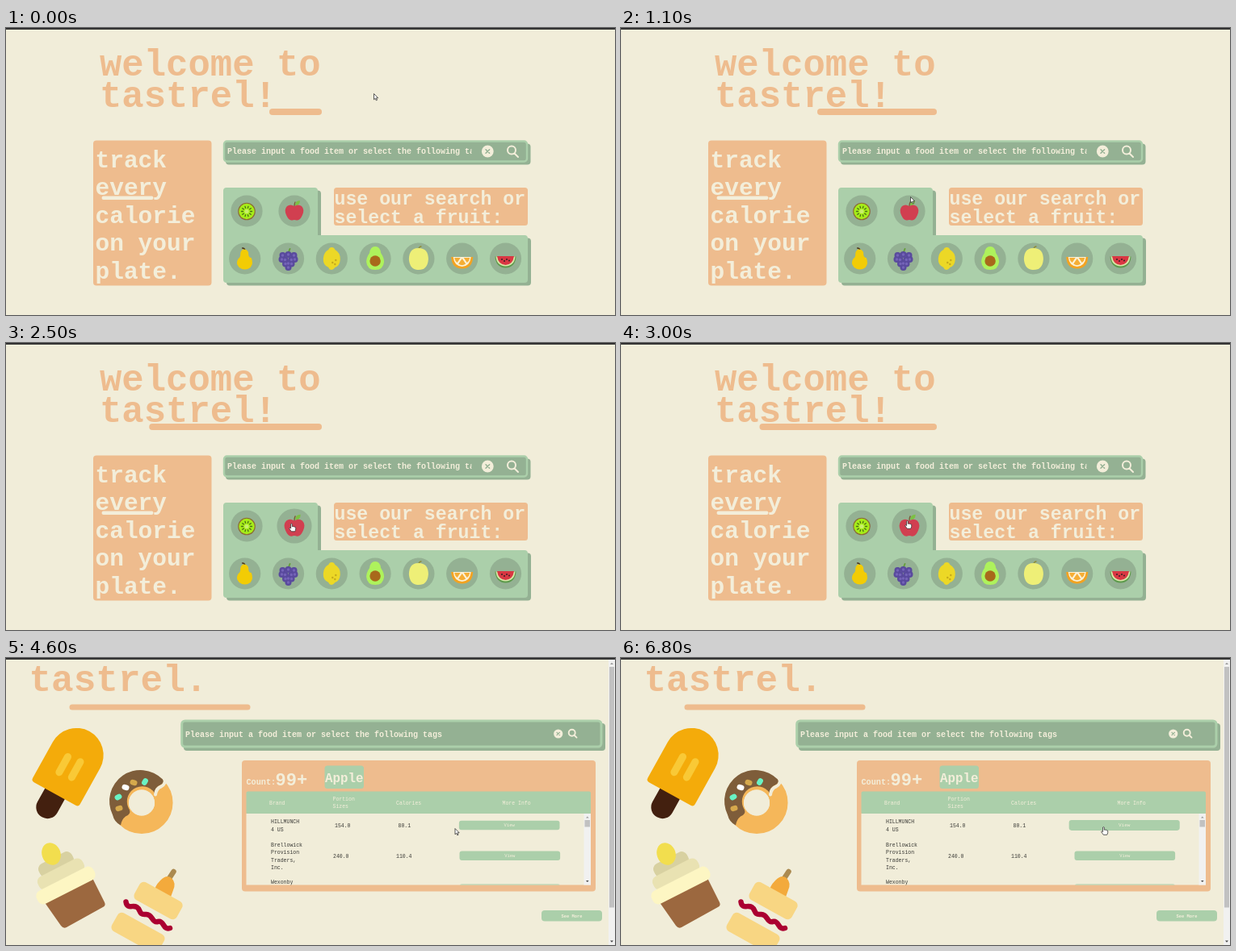
Recreate the animation shown at these times as an HTML page. Size 754 by 356 pixels, loop 8 s.

```html
<!DOCTYPE html>
<html lang="en">
<head>
<meta charset="utf-8">
<title>Food tracker</title>
<style>
  html, body { margin: 0; width: 100%; height: 100%; overflow: hidden; background: #f1edd9; }
  svg { display: block; width: 754px; height: 356px; }
  text { font-family: "Liberation Mono", "DejaVu Sans Mono", monospace; fill: #f3eeda; white-space: pre; }
  .b { font-weight: bold; }
  .peach { fill: #eebc8e; }
  .light { fill: #abcfaa; }
  .dark { fill: #94b193; }
  .cream { fill: #f3eeda; }
  .ink { fill: #3a3a36; }
  .line { fill: none; stroke-linecap: round; }
</style>
</head>
<body>
<svg viewBox="0 0 754 356">
  <defs>
    <clipPath id="inputClip"><rect x="274" y="142" width="302.5" height="22"/></clipPath>
    <clipPath id="rowsClip"><rect x="297.5" y="193" width="426.5" height="88.5"/></clipPath>
  </defs>
  <rect width="754" height="356" fill="#f1edd9"/>

  <g id="home">
    <rect id="bar" class="peach" y="100" height="8" rx="4"/>
    <rect class="peach" x="108" y="139.5" width="146.5" height="180" rx="4"/>
    <rect class="cream" x="118.500" y="208.500" width="64" height="4.500" rx="2.200"/>

    <rect class="dark" x="272" y="143.500" width="377.500" height="26" rx="4"/>
    <rect class="dark" x="270" y="140.500" width="375" height="25" rx="3.500" stroke="#abcfaa" stroke-width="2.400"/>
    <g id="hint" clip-path="url(#inputClip)"></g>
    <circle class="cream" cx="596.300" cy="153" r="7.400"/>
    <path class="line" d="M594 150.700l4.600 4.600m0-4.600l-4.600 4.600" stroke="#94b193" stroke-width="1.500"/>
    <path class="line" d="M629.500 155.500L634 160M631 151.500a5 5 0 1 0-10 0a5 5 0 1 0 10 0" stroke="#f3eeda" stroke-width="2"/>

    <path id="tray" class="dark" transform="translate(4 3.500)"
      d="M273 198H382a4 4 0 0 1 4 4V257H642a4 4 0 0 1 4 4V312a4 4 0 0 1-4 4H273a4 4 0 0 1-4-4V202a4 4 0 0 1 4-4z"/>
    <use href="#tray" id="trayTop"/>
    <rect class="peach" x="406" y="198" width="240" height="47" rx="3.500"/>
    <g id="fruits"></g>
  </g>

  <g id="results">
    <rect class="peach" x="78.500" y="57.500" width="224" height="7" rx="3.500"/>

    <g transform="translate(60.500 168.500) rotate(29)">
      <path class="line" d="M0 0V19" stroke="#43200f" stroke-width="28"/>
      <path d="M-33.500-55a33.500 33.500 0 0 1 67 0V-4a4 4 0 0 1-4 4h-59a4 4 0 0 1-4-4z" fill="#f4ab0a"/>
      <path class="line" d="M-8.300-26v-22M8.300-28v-22" stroke="#f9c936" stroke-width="9"/>
    </g>

    <g transform="translate(168 179.500)">
      <circle r="27.300" fill="none" stroke="#f5b75a" stroke-width="22.500"/>
      <path d="M-26 28Q-34 24-36 15A38.500 38.500 0 0 1 26-29Q29-25 23-22Q17-20 16-12A18 18 0 0 0-15 9Q-13 14-20 17Q-25 21-26 28z" fill="#7e5d3a"/>
      <circle r="16" fill="#f1edd9"/>
      <path class="line" d="M28.500-30Q30-23 24-20Q18-18 17-10" stroke="#f1edd9" stroke-width="4"/>
      <g id="sprinkles"></g>
    </g>

    <path d="M47 302L106 271L122 303Q124 307 120 309L75 334Q71 336 68 332z" fill="#9c683f"/>
    <g id="frosting"></g>
    <ellipse cx="56" cy="243" rx="11.500" ry="14" transform="rotate(-20 56 243)" fill="#f2de4e"/>

    <path class="line" d="M199 278L207.500 265" stroke="#ab8a50" stroke-width="6.500"/>
    <path d="M183 291Q184 283 191 276Q199 268 205 273Q211 279 207 288L202 302L181 298z" fill="#f3aa3c"/>
    <g fill="#f8d683">
      <rect x="-30" y="-12.500" width="60" height="25" rx="6" transform="translate(188.500 301) rotate(29)"/>
      <rect x="-33" y="-13" width="66" height="26" rx="6" transform="translate(163.500 341) rotate(29)"/>
    </g>
    <path class="line" d="M148.500 302.500C150 312 157 306 162 309S164 319 173 318S180 329 188 327S194 338 203 335" stroke="#ab0031" stroke-width="6.500"/>

    <rect class="dark" x="220" y="81" width="522" height="34" rx="4"/>
    <rect class="dark" x="217.700" y="78" width="519.300" height="32" rx="4" stroke="#abcfaa" stroke-width="3"/>
    <circle class="cream" cx="683.700" cy="94" r="5.600"/>
    <path class="line" d="M682 92.300l3.400 3.400m0-3.400l-3.400 3.400" stroke="#94b193" stroke-width="1.200"/>
    <path class="line" d="M703.300 95.500L706.500 98.700M704.700 92.700a4 4 0 1 0-8 0a4 4 0 1 0 8 0" stroke="#f3eeda" stroke-width="1.900"/>

    <rect class="peach" x="292" y="127" width="438" height="162.500" rx="4"/>
    <rect class="light" x="394.500" y="133.500" width="48.500" height="28.500" rx="3.500"/>
    <rect class="light" x="297.500" y="165.500" width="426.500" height="28" rx="2"/>
    <rect x="297.500" y="193" width="426.500" height="88.500" fill="#f1edd9"/>
    <g id="rows" clip-path="url(#rowsClip)">
      <g id="view"><rect class="light" x="-62.300" y="-5.800" width="124.600" height="11.600" rx="3"/></g>
      <rect class="light" x="561.500" y="239.500" width="124.600" height="11.600" rx="3"/>
      <rect class="light" x="561.500" y="280.600" width="124.600" height="11.600" rx="3"/>
    </g>
    <rect x="715.500" y="193" width="8.500" height="88.500" fill="#f1f1f0"/>
    <rect x="716.500" y="201" width="6.500" height="8.500" fill="#c1c1c1"/>
    <path d="M718 198.500l1.800-2 1.800 2z" fill="#999"/>
    <path d="M718 276l1.800 2 1.800-2z" fill="#444"/>
    <rect class="light" x="663" y="313" width="75" height="13.500" rx="4"/>

    <rect x="746" y="2" width="8" height="354" fill="#f1f1f0"/>
    <rect x="747" y="11" width="6" height="298.500" fill="#c1c1c1"/>
    <path d="M748 8l2-2.300 2 2.300z" fill="#999"/>
    <path d="M748 350.500l2 2.300 2-2.300z" fill="#444"/>
  </g>

  <rect width="754" height="2" fill="#343434"/>
  <g id="cursor" stroke-linejoin="round" stroke="#333" stroke-width=".8" fill="#fff">
    <path id="arrow" d="M0 0V7.300L1.700 5.800 2.800 8.300 4 7.800 2.900 5.300H5.200z"/>
    <path id="hand" d="M-.9 0Q0-1 .8 0V3.200Q1.700 2.600 2.400 3.400Q3.300 2.900 3.900 3.700Q5.100 3.500 5.200 4.700V6.500Q5 8 4.200 9.300H-.2Q-1.300 7.700-2.800 5.800Q-2.700 4.600-1.600 4.900L-.9 5.600z"/>
  </g>
</svg>
<script>
const $ = id => document.getElementById(id);

function add(parent, tag, attrs) {
  const el = document.createElementNS("http://www.w3.org/2000/svg", tag);
  for (const k in attrs) el.setAttribute(k, attrs[k]);
  parent.appendChild(el);
  return el;
}

function label(parent, str, x, y, size, cls = "b", anchor = "start") {
  add(parent, "text", { x, y, "font-size": size, class: cls, "text-anchor": anchor }).textContent = str;
}

const home = $("home"), results = $("results"), rows = $("rows");
const PROMPT = "Please input a food item or select the following tags";

$("trayTop").remove();
const trayTop = $("tray").cloneNode();
trayTop.removeAttribute("id");
trayTop.setAttribute("class", "light");
trayTop.setAttribute("transform", "");
$("tray").after(trayTop);

label(home, "welcome to", 116, 58.5, 45.6, "b peach");
label(home, "tastrel!", 116, 97.5, 45.6, "b peach");
["track", "every", "calorie", "on your", "plate."].forEach((s, i) =>
  label(home, s, 110.5, 172.5 + i * 34.5, 29.5));
label($("hint"), PROMPT, 274, 156.3, 10);
label(home, "use our search or", 406.5, 218.5, 23.2);
label(home, "select a fruit:", 406.5, 241.5, 23.2);

// Fruit drawings, each centred on its plate
const disc = (x, y, r, fill) => `<circle cx="${x}" cy="${y}" r="${r}" fill="${fill}"/>`;
const shape = (d, fill) => `<path d="${d}" fill="${fill}"/>`;
const stroke = (d, color, w) => `<path class="line" d="${d}" stroke="${color}" stroke-width="${w}"/>`;
const ring = (n, fn) => Array.from({ length: n }, (_, i) => fn(i * 2 * Math.PI / n)).join("");
const dots = (list, r, fill) => list.map(([x, y]) => disc(x, y, r, fill)).join("");

const kiwi = disc(0, 0.5, 10.8, "#8b6a35") + disc(0, 0.5, 9.7, "#a5ec18") +
  ring(10, a => stroke(`M${4.5 * Math.cos(a)} ${0.5 + 4.5 * Math.sin(a)}L${6.5 * Math.cos(a)} ${0.5 + 6.5 * Math.sin(a)}`, "#4c7018", 1.3)) +
  disc(0, 0.5, 2.6, "#c9f06a");

const apple = stroke("M0-6Q0-9 1-11", "#7b5a35", 1.3) +
  shape("M1-7Q1-13 7-13Q7-7 1-7z", "#7cc043") +
  shape("M0-6Q5-9 9-6Q13-2 10 5Q7 12 3 11.500Q0 10.500-3 11.500Q-7 12-10 5Q-13-2-9-6Q-5-9 0-6z", "#d13f50");

const pear = stroke("M0-10Q0-13-3-13", "#4b3518", 1.6) +
  shape("M-1-11.500Q5-11 4.500-5Q5-1 8-1Q11 6 7 11Q0 16-7 11Q-12 6-8 0Q-5-2-5.500-6Q-5-11-1-11.500z", "#f2cc05");

const berries = [[-7, -4], [0, -5], [7, -4], [-4, 1.5], [3.8, 1.5], [0, 6], [-8, 1], [8, 1], [0, 11], [-3.5, 6.5], [4, 6.5]];
const grapes = stroke("M0-7L2-12", "#67a03c", 2) + dots(berries, 4, "#594a9d") + dots(berries, 1.7, "#7463b8");

const lemon = shape("M0-14Q3-14 4-11Q11-7 10.500 1Q10 9 4 11Q2 14 0 14Q-3 14-4 11Q-11 8-10.500 0Q-10-8-4-11Q-3-14 0-14z", "#ecd826") +
  dots([[1, 5], [5, 2], [4, 7]], 1.2, "#c5a91b");

const avocado = shape("M0-15Q6-15 7-7Q11-1 11 4Q10 14 0 14Q-10 14-11 4Q-11-1-7-7Q-6-15 0-15z", "#aef25c") +
  disc(0, 3, 6.7, "#a8691b");

const mango = stroke("M0-12Q1-15 3-15", "#8d8b35", 1.6) +
  shape("M0-13Q12-13 12 1Q11 14 0 14Q-11 14-12 1Q-12-13 0-13z", "#eeef77");

const orange = shape("M-13.500-2H13.500Q13 12 0 12.500Q-13 12-13.500-2z", "#f3a321") +
  shape("M-11-2H11Q10 9 0 10Q-10 9-11-2z", "#fbf1d5") +
  shape("M-9.500-1H-2L-6 5Q-9 3-9.500-1zM9.500-1H2L6 5Q9 3 9.500-1zM0 0L4.500 6.500Q0 10-4.500 6.500z", "#f5ae35");

const melon = shape("M-13-2.500H13Q12 11 0 11.500Q-12 11-13-2.500z", "#5b9a4b") +
  shape("M-12-2.500H12Q11 9 0 9.500Q-11 9-12-2.500z", "#d9e6a8") +
  shape("M-10.500-3H10.500Q9 7.500 0 8Q-9 7.500-10.500-3z", "#d93743") +
  dots([[-4.5, 1], [-1.5, 3], [1.5, 1], [4.5, 2.5]], 1, "#352224");

const plates = [[kiwi, 298, 227], [apple, 357, 227]].concat(
  [pear, grapes, lemon, avocado, mango, orange, melon].map((art, i) => [art, 295.7 + i * 53.8, 286]));
const nodes = plates.map(([art, x, y]) => {
  const g = add($("fruits"), "g", { transform: `translate(${x} ${y})` });
  g.innerHTML = disc(0, 0, 19.6, "#94b193") + art;
  return g;
});

// Second page
[[-20, -19, "#fff", 20], [-10, -25, "#d6a94c", 20], [4, -26, "#6af3c4", -60], [-29, -7, "#6af3c4", -30], [-28, 7, "#d6a94c", -15]]
  .forEach(([x, y, fill, a]) => add($("sprinkles"), "rect",
    { x: -4.5, y: -3.3, width: 9, height: 6.6, rx: 3.2, fill, transform: `translate(${x} ${y}) rotate(${a})` }));
[[62, 256, 46, "#d8d1a1"], [68, 268, 62, "#e9e2b2"], [74, 282, 79, "#fdf6c3"]]
  .forEach(([x, y, w, fill]) => add($("frosting"), "rect",
    { x: -w / 2, y: -9, width: w, height: 18, rx: 7.5, fill, transform: `translate(${x} ${y}) rotate(-27)` }));

label(results, "tastrel.", 28.5, 41, 46, "b peach");
label(results, PROMPT, 222, 97.5, 10);
label(results, "Count:", 297.5, 157, 10.2);
label(results, "99+", 333.5, 158, 22);
label(results, "Apple", 395, 154, 15.8);
[["Brand", 326, 181.7], ["Portion", 404.5, 177], ["Sizes", 404.5, 186.3], ["Calories", 483, 181.7], ["More Info", 614.5, 181.7]]
  .forEach(([s, x, y]) => label(results, s, x, y, 6.5, ""));
[["HILLMUNCH", 328, 205], ["4 US", 328, 214.5], ["154.0", 407, 210], ["80.1", 485.5, 210],
 ["Brellowick", 328, 233.5], ["Provision", 328, 243], ["Traders,", 328, 252.5], ["Inc.", 328, 262],
 ["240.0", 405, 247.7], ["110.4", 483, 247.7], ["Wexonby", 328, 280]]
  .forEach(([s, x, y]) => label(rows, s, x, y, 6.5, "ink"));
label($("view"), "View", 0, 1.8, 5.5, "", "middle");
label(rows, "View", 623.8, 247.2, 5.5, "", "middle");
label(results, "See More", 700.5, 321.5, 5.4, "b", "middle");

// Tables of [time, value, ...], joined by straight steps
const LOOP = 8000, SWITCH = 3700;
const barLeft = [[0, 326], [900, 256], [1100, 243], [1800, 202.5], [1900, 198], [2300, 182], [2700, 172.5], [3000, 171.5]];
const pointer = [[0, 455.5, 81.5], [300, 455, 82], [500, 443, 98], [700, 407, 145], [900, 373, 190], [1100, 358.5, 209.5],
  [1300, 354, 221], [1500, 353.5, 224.5], [1900, 353.5, 224.5], [2700, 353.5, 224.5], [3000, 354.5, 221], [3700, 354.5, 221],
  [4500, 536, 215], [4600, 556, 211.5], [4700, 573, 210.5], [4800, 586, 210], [5000, 596, 210], [5100, 597.5, 210]];
const appleZoom = [[1200, 1], [1400, 1.1]];
const viewZoom = [[4700, 1], [4900, 1.1]];

function at(table, t, col = 1) {
  const i = table.findIndex(row => row[0] > t);
  if (i === 0) return table[0][col];
  if (i < 0) return table[table.length - 1][col];
  const a = table[i - 1], b = table[i];
  return a[col] + (b[col] - a[col]) * (t - a[0]) / (b[0] - a[0]);
}

function draw(t) {
  const first = t < SWITCH;
  home.style.display = first ? "" : "none";
  results.style.display = first ? "none" : "";

  const left = at(barLeft, t);
  $("bar").setAttribute("x", left);
  $("bar").setAttribute("width", 391 - left);
  nodes[1].setAttribute("transform", `translate(357 227) scale(${at(appleZoom, t)})`);
  $("view").setAttribute("transform", `translate(623.2 207.5) scale(${at(viewZoom, t)})`);

  const hand = t >= 1200 && t < SWITCH + 100 || t >= 4700;
  $("hand").style.display = hand ? "" : "none";
  $("arrow").style.display = hand ? "none" : "";
  $("cursor").setAttribute("transform", `translate(${at(pointer, t)} ${at(pointer, t, 2)})`);
}

const start = performance.now();
function tick() {
  const t = (performance.now() - start) % LOOP;
  draw(Math.floor(t / 100) * 100);
  requestAnimationFrame(tick);
}
tick();
</script>
</body>
</html>
```
